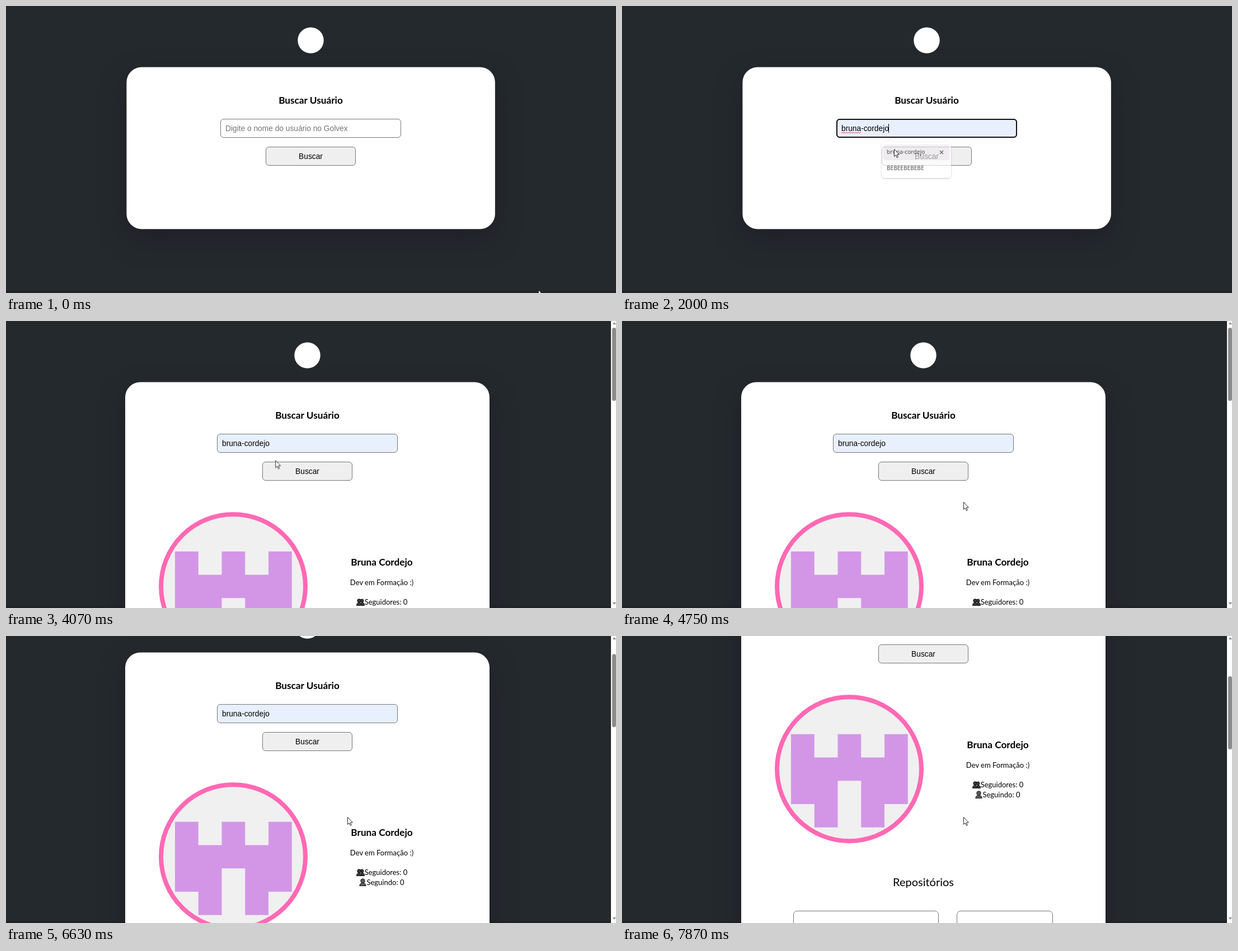
Recreate the animation shown at these times as an HTML page. Size 1090 by 514 pixels, loop 7.99 s.

```html
<!DOCTYPE html>
<html lang="pt-BR">
<head>
<meta charset="utf-8">
<title>Buscar Usuário</title>
<style>
@property --scroll { syntax: "<number>"; inherits: true; initial-value: 0; }

html, body { margin: 0; width: 100%; height: 100%; overflow: hidden; background: #24292d; }
#stage {
  position: relative; width: 1090px; height: 514px; overflow: hidden;
  font: 13px/20px Lato, sans-serif; color: #000;
  animation: scroll 7990ms step-end infinite;
}
#stage div, #stage svg { position: absolute; box-sizing: border-box; }
#stage .anim { animation: 7990ms step-end infinite; }

.strip { left: 0; top: 510px; width: 100%; height: 4px; background: #202428; }
.shift { inset: 0; animation-name: shift !important; }
.page { inset: 0; translate: 0 calc(var(--scroll) * -1px); }
.page > svg { left: 0; top: 0; overflow: visible; }
.card {
  x: 215.4px; y: 109.5px; width: 658.5px; height: 290px; rx: 27px; fill: #fff;
  filter: drop-shadow(0 18px 22px rgba(25, 21, 31, .5)); animation-name: card !important;
}
.mid { left: 344.5px; width: 400px; text-align: center; white-space: nowrap; }
.bold { font-weight: 700; font-size: 17.2px; }

.field, .button { height: 34px; border: 1px solid #767676; border-radius: 6px; font: 13.75px/33px "Liberation Sans", Arial, sans-serif; }
.field { left: 383px; top: 202px; width: 323px; background: #fff; animation-name: field !important; }
.ring { inset: -1px; border: 2px solid #101010; border-radius: 6px; opacity: 0; animation-name: ring !important; }
.field .txt { left: 8px; top: 0; white-space: nowrap; opacity: 0; }
.field .hint { color: #757575; opacity: 1; animation-name: hint !important; }
.typed { animation-name: typed !important; }
.value { animation-name: value !important; }
.squiggle { left: 8px; top: 22px; opacity: 0; animation-name: squiggle !important; }
.caret { left: 8px; top: 8px; width: 1px; height: 16px; background: #000; opacity: 0; animation-name: caret !important; }
.button { left: 464px; top: 252px; width: 161px; text-align: center; background: #efefef; animation-name: button !important; }

.list {
  left: 464px; top: 244px; width: 124px; height: 180px; border-radius: 5px; background: #fff;
  box-shadow: 0 1px 3px rgba(0, 0, 0, .35); opacity: 0; animation-name: list !important;
  font: 600 10px/29px "Open Sans", sans-serif; color: #2c2c2c;
}
.list .tail { left: 12px; top: -4px; width: 9px; height: 9px; rotate: 45deg; background: #fff; box-shadow: -1px -1px 1px rgba(0, 0, 0, .1); }
.rows { inset: 0; padding: 3px 9px; overflow: hidden; background: #fff; border-radius: 5px; }
.rows p { position: relative; margin: 0; }
.hover { left: 3px; top: 4px; width: 118px; height: 28px; border-radius: 3px; background: #edebee; opacity: 0; animation-name: hover !important; }
.hover svg { left: 100px; top: 10px; }

.result { inset: 0; opacity: 0; animation-name: result !important; }
#stage .avatar { left: 279px; top: 342px; overflow: visible; }
.info { left: 577.5px; width: 200px; text-align: center; white-space: nowrap; }
#stage .info svg { position: static; vertical-align: -2px; }
.repo { top: 729px; height: 90px; border: 1px solid #777; border-radius: 7px; padding-top: 16px; text-align: center; white-space: nowrap; overflow: hidden; }
.bar { left: 1081px; top: 0; width: 9px; height: 514px; background: #fcfcfc; opacity: 0; animation-name: result !important; }
.thumb { left: 2px; top: 12px; width: 7px; height: 131px; border-radius: 4px; background: #8b8b8b; translate: 0 calc(var(--scroll) * .253px); }
.bar svg { left: 2px; top: 0; }

.pointer { left: 0; top: 0; width: 0; height: 0; animation-name: pointer !important; }
.pointer svg { overflow: visible; left: 0; top: 0; }
.arrow { animation-name: arrow !important; }
.beam { opacity: 0; animation-name: beam !important; }

@keyframes scroll {
  0% { --scroll: 0; }
  80.35% { --scroll: 10; } 81.85% { --scroll: 72; } 82.978% { --scroll: 80; }
  86.608% { --scroll: 95; } 87.984% { --scroll: 152; } 89.111% { --scroll: 161; }
  97.246%  { --scroll: 182; } 98.498%, 100% { --scroll: 237; }
}
@keyframes shift { 46.182%, 100% { translate: -6px 0; } }
@keyframes card { 46.182%, 100% { x: 219px; width: 651px; height: 1900px; } }
@keyframes result { 46.182%, 100% { opacity: 1; } }
@keyframes field { 20.9%, 100% { background: #e8f0fe; } }
@keyframes ring { 13.767% { opacity: 1; } 32.79%, 100% { opacity: 0; } }
@keyframes hint { 16.895%, 100% { opacity: 0; } }
@keyframes typed { 16.895% { opacity: 1; } 20.9%, 100% { opacity: 0; } }
@keyframes value { 20.9%, 100% { opacity: 1; } }
@keyframes squiggle { 25.03% { opacity: 1; } 32.79%, 100% { opacity: 0; } }
@keyframes caret {
  13.767% { opacity: 1; left: 8px; }
  16.895% { opacity: 1; left: 16px; }
  20.9% { opacity: 0; left: 92px; }
  25.03% { opacity: 1; left: 92px; }
  30.788%, 100% { opacity: 0; left: 92px; }
}
@keyframes button {
  0% { background: #efefef; }
  32.79% { background: #f5f5f5; } 34.668% { background: #e5e5e5; } 40.425% { background: #efefef; }
  51.88% { background: #e5e5e5; } 55.66%, 100% { background: #efefef; }
}
@keyframes list {
  13.767% { opacity: 1; height: 180px; }
  16.895% { opacity: 1; height: 64px; }
  25.03% { opacity: .67; height: 64px; }
  26.282% { opacity: .3; height: 64px; }
  27.409%, 100% { opacity: 0; height: 64px; }
}
@keyframes hover { 20.9%, 100% { opacity: 1; } }
@keyframes pointer {
  0% { translate: 951px 508px; }
  .876% { translate: 951px 508px; animation-timing-function: steps(10, start); }
  11.138% { translate: 452px 244px; }
  11.139% { translate: 446px 230px; }
  12.015% { translate: 443px 221px; }
  17.896% { translate: 449px 229px; }
  18.897% { translate: 459px 238px; }
  19.899% { translate: 469px 243px; }
  20.9% { translate: 476px 246px; }
  22.903% { translate: 484px 250px; }
  25.03% { translate: 486px 256px; }
  38.548% { translate: 484px 270px; }
  39.424% { translate: 474px 253px; }
  40.425% { translate: 467px 241px; }
  50.938% { translate: 467px 241px; animation-timing-function: steps(10, start); }
  60.39%, 100% { translate: 610px 324px; }
}
@keyframes arrow { 11.139% { opacity: 0; } 18.897%, 100% { opacity: 1; } }
@keyframes beam { 11.139% { opacity: 1; } 18.897%, 100% { opacity: 0; } }
</style>
</head>
<body>
<div id="stage">
  <div class="strip"></div>
  <div class="shift anim">
    <div class="page">
      <svg width="1090" height="514">
        <rect class="card anim"/>
        <circle cx="544.5" cy="61.5" r="23.2" fill="#fff"/>
      </svg>
      <div class="mid bold" style="top:159px">Buscar Usuário</div>
      <div class="field anim">
        <div class="ring anim"></div>
        <div class="txt hint anim">Digite o nome do usuário no Golvex</div>
        <div class="txt typed anim">b</div>
        <div class="txt value anim">bruna-cordejo</div>
        <svg class="squiggle anim" width="35" height="4">
          <defs><pattern id="wave" width="4" height="4" patternUnits="userSpaceOnUse">
            <path d="M0 3L2 1L4 3" fill="none" stroke="#e5484d"/>
          </pattern></defs>
          <rect width="35" height="4" fill="url(#wave)"/>
        </svg>
        <div class="caret anim"></div>
      </div>
      <div class="button anim">Buscar</div>

      <div class="result anim">
        <svg class="avatar" width="266" height="266">
          <circle cx="133" cy="133.2" r="129" fill="#f0f0f0" stroke="#ff69b4" stroke-width="8"/>
          <path transform="translate(29 70.8) scale(41.75)" fill="#d396e7"
            d="M0 0h1v1h1v-1h1v1h1v-1h1v3h-1v1h-1v-2h-1v2h-1v-1h-1z"/>
        </svg>
        <div class="info bold" style="top:422px">Bruna Cordejo</div>
        <div class="info" style="top:458px">Dev em Formação :)</div>
        <div class="info" style="top:493px">
          <svg width="15" height="13"><g fill="#3b3638" stroke="#111">
            <circle cx="10" cy="4" r="3"/><path d="M7 12.5q0-5 4-5q3.5 0 3.5 5z"/>
            <circle cx="5" cy="4" r="3.2"/><path d="M.5 12.5q0-5 4.5-5t4.5 5z"/>
          </g></svg>Seguidores: 0</div>
        <div class="info" style="top:511px">
          <svg width="13" height="14"><g fill="#5b5759" stroke="#222">
            <circle cx="6.5" cy="4.5" r="3.8"/><path d="M.8 13.5q0-5 5.7-5t5.7 5z"/>
          </g></svg>Seguindo: 0</div>
        <div class="mid" style="top:667px;font-size:20px">Repositórios</div>
        <div class="repo" style="left:312px;width:260px">bruna-cordejo</div>
        <div class="repo" style="left:604px;width:172px">codifica-fundo-Brasil</div>
      </div>

      <div class="list anim">
        <div class="tail"></div>
        <div class="rows">
          <div class="hover anim">
            <svg width="8" height="8"><path d="M1 1L7 7M7 1L1 7" stroke="#333" stroke-width="1.5"/></svg>
          </div>
          <p>bruna-cordejo</p><p>BEBEEBEBEBE</p><p>teste</p><p>projeto</p><p>fulano</p><p>teste123</p>
        </div>
      </div>
    </div>
  </div>

  <div class="bar anim">
    <div class="thumb"></div>
    <svg width="7" height="514" fill="#8b8b8b"><path d="M1 6L4 2L7 6zM1 504L4 508L7 504z"/></svg>
  </div>

  <div class="pointer anim">
    <svg class="arrow anim" width="12" height="18">
      <path d="M.5.5V13.5L3.4 10.8L5.3 15.5L7.3 14.6L5.4 10H9.3z" fill="#fff" stroke="#111" stroke-width=".9"/>
    </svg>
    <svg class="beam anim" width="8" height="16">
      <path d="M-3-7.5H-1L0-6.5L1-7.5H3M-3 7.5H-1L0 6.5L1 7.5H3M0-6.5V6.5" fill="none" stroke="#111"/>
    </svg>
  </div>
</div>
</body>
</html>
```
